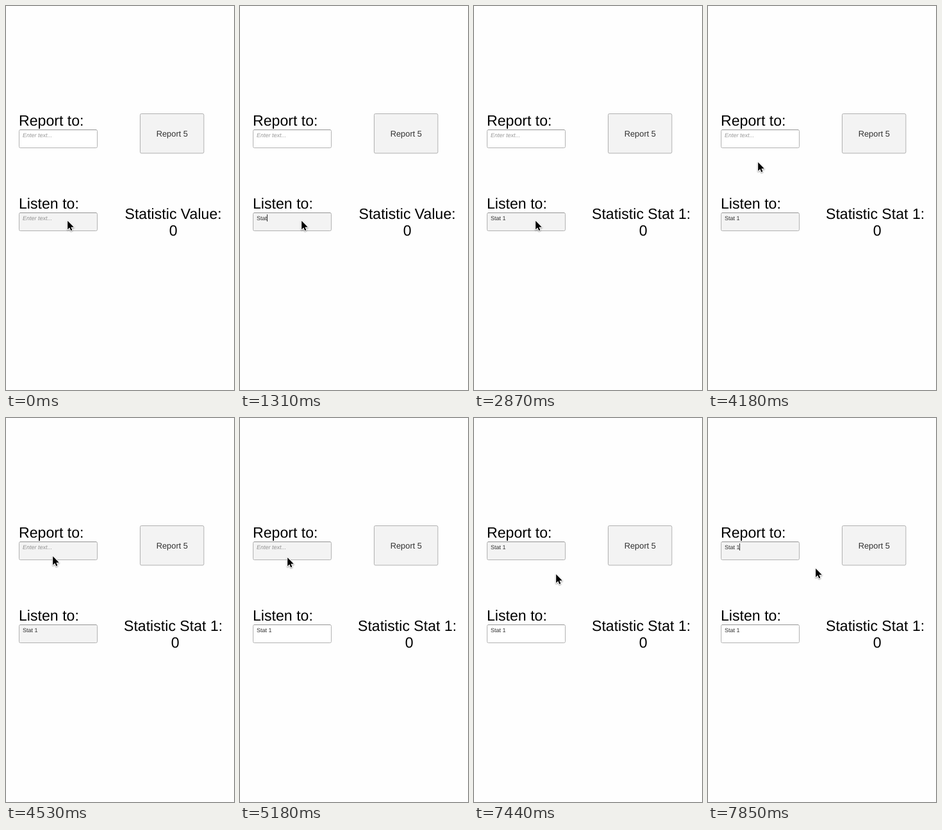
These frames come from a looping animation (356x597 px, 8000 ms). An HTML page with a canvas:

```html
<!DOCTYPE html>
<html lang="en">
<head>
<meta charset="utf-8">
<title>Statistic reporting form</title>
<style>
  html, body { margin: 0; width: 100%; height: 100%; overflow: hidden; background: #fefefe; }
  canvas { display: block; }
</style>
</head>
<body>
<canvas id="stage" width="356" height="597"></canvas>
<script>
const ctx = document.getElementById('stage').getContext('2d');
const LOOP = 8000;
const STEP = 58.6;   // pointer refresh interval
const BLINK = 540;   // caret on and off time
const FADE = 100;
const HOVER = 4340;
const FAMILY = '"Liberation Sans", Arial, sans-serif';
const INK = '#323232';
const TITLE = 23.14, LABEL = 12.86, SMALL = 9;
const WORD = 'Stat 1';

const listen = { focus: -850, keys: [650, 1070, 1130, 1310, 2090, 2330], submit: 2870 };
const report = { focus: 4640, keys: [5540, 5780, 5840, 5950, 6190, 6480], submit: Infinity };

// Quadratic curves, slowing towards the end
const toField = { start: 3941, steps: 15, from: [96, 333], bend: [69, 200], to: [74, 216] };
const toButton = { start: 7261, steps: 10, from: toField.to, bend: [133, 259], to: [168, 233] };

const clamp01 = v => Math.min(1, Math.max(0, v));
const easeOut = u => 1 - (1 - u) ** 2;

function typingAt({ focus, keys, submit }, t) {
  const typed = keys.filter(key => key <= t);
  const lastKey = typed.length ? typed[typed.length - 1] : focus;
  const blinkOn = (t - lastKey) % (2 * BLINK) < BLINK;
  return { value: WORD.slice(0, typed.length), caret: t >= focus && t < submit && blinkOn };
}

function pointerAt(t) {
  const { start, steps, from, bend, to } = t < toButton.start ? toField : toButton;
  const p = easeOut(clamp01(Math.floor((t - start) / STEP) / steps));
  const q = 1 - p;
  return from.map((a, i) => Math.round(q * q * a + 2 * q * p * bend[i] + p * p * to[i]));
}

function text(str, x, y, size, color = '#000', align = 'left', style = 'normal') {
  ctx.font = `${style} ${size}px ${FAMILY}`;
  ctx.textAlign = align;
  ctx.fillStyle = color;
  ctx.fillText(str, x, y);
}

function box(x, y, w, h, fill, border) {
  ctx.beginPath();
  ctx.roundRect(x + 0.5, y + 0.5, w - 1, h - 1, 2);
  ctx.fillStyle = fill;
  ctx.fill();
  ctx.strokeStyle = border;
  ctx.lineWidth = 1;
  ctx.stroke();
}

function field(y, { value, caret }, shade) {
  const level = Math.round(255 - 12 * shade);
  box(20, y, 123, 29, `rgb(${level},${level},${level})`, '#b2b2b2');
  ctx.fillStyle = '#959595';
  ctx.fillRect(22, y, 119, 1);

  if (value) text(value, 26, y + 12, SMALL, INK);
  else text('Enter text...', 26, y + 12, SMALL, 'rgba(50,50,50,0.5)', 'left', 'italic');

  if (caret) {
    ctx.font = `${SMALL}px ${FAMILY}`;
    ctx.fillStyle = INK;
    ctx.fillRect(Math.floor(26.05 + ctx.measureText(value).width), y + 3, 1, 11);
  }
}

function pointer(x, y) {
  ctx.save();
  ctx.translate(x + 0.2, y + 1);
  const arrow = new Path2D('M0 0 V13.5 L3.1 10.6 L5.1 15.2 L7.2 14.3 L5.2 9.8 H9.6 Z');
  ctx.lineJoin = 'round';
  ctx.lineWidth = 2;
  ctx.strokeStyle = '#fff';
  ctx.shadowColor = 'rgba(0,0,0,0.4)';
  ctx.shadowBlur = 2;
  ctx.shadowOffsetY = 1;
  ctx.stroke(arrow);
  ctx.shadowColor = 'transparent';
  ctx.fillStyle = '#000';
  ctx.fill(arrow);
  ctx.restore();
}

function draw(t) {
  ctx.fillStyle = '#fefefe';
  ctx.fillRect(0, 0, 356, 597);

  text('Report to:', 20, 186, TITLE);
  text('Listen to:', 20, 315, TITLE);
  field(192, typingAt(report, t), clamp01((t - HOVER) / FADE));
  field(321, typingAt(listen, t), 1 - clamp01((t - report.focus) / FADE));

  box(209, 167, 100.4, 62.4, '#f3f3f3', '#b0b0b0');
  text('Report 5', 259.3, 203, LABEL, INK, 'center');

  const listening = t >= listen.submit;
  text(`Statistic ${listening ? WORD : 'Value'}:`, 261.1, 331, TITLE, '#000', 'center');
  text('0', listening ? 264.3 : 261.2, 357, TITLE, '#000', 'center');

  pointer(...pointerAt(t));
}

ctx.textRendering = 'geometricPrecision';
ctx.fontKerning = 'normal';
const began = performance.now();
function tick() {
  draw((performance.now() - began) % LOOP);
  requestAnimationFrame(tick);
}
tick();
</script>
</body>
</html>
```
